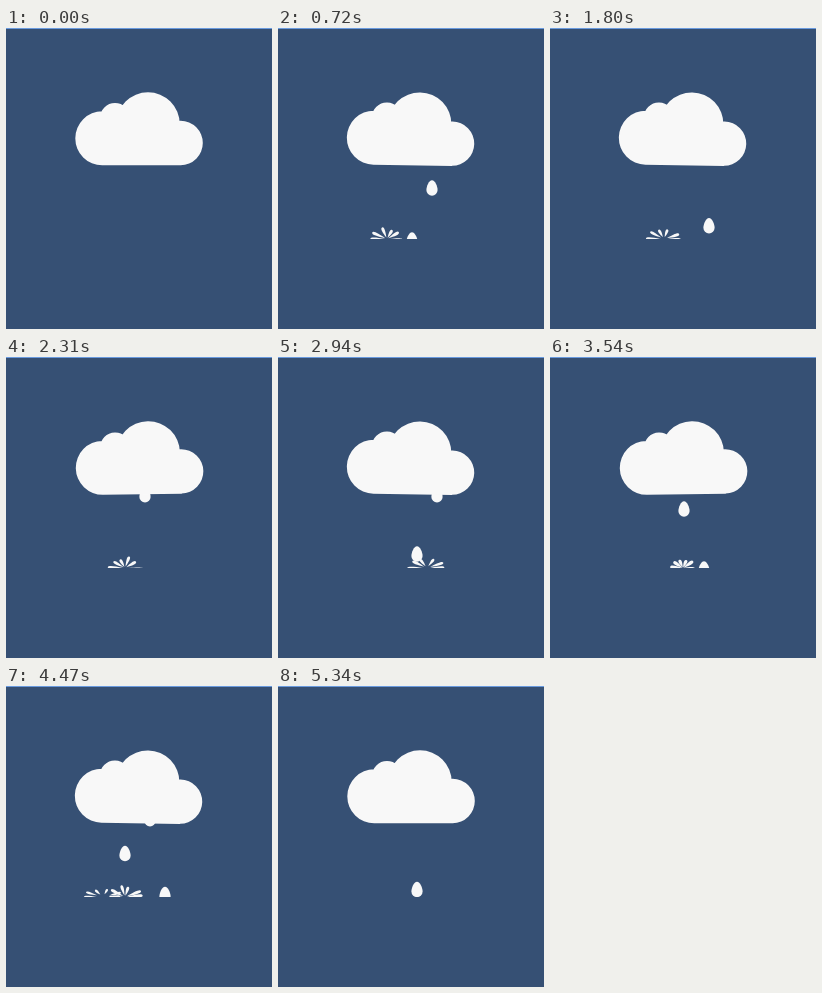
An HTML page with a canvas that plays this animation: 266 by 301 pixels, repeating every 5370 ms.

```html
<!DOCTYPE html>
<html lang="en">
<head>
<meta charset="utf-8">
<title>Rain cloud</title>
<style>
  html, body { margin: 0; width: 100%; height: 100%; overflow: hidden; background: #365074; }
  canvas { display: block; width: 266px; height: 301px; }
</style>
</head>
<body>
<canvas id="stage"></canvas>
<script>
const W = 266, H = 301, LOOP = 5370, STEP = 30;
const GROUND = 211, FALL = 400, SPLASH = 300;
const MAX_GAP = 400, GAP = 210, RAYS = 6;

const canvas = document.getElementById('stage');
const ctx = canvas.getContext('2d');
const ratio = window.devicePixelRatio || 1;
canvas.width = W * ratio;
canvas.height = H * ratio;

const clamp = (v, lo, hi) => Math.min(hi, Math.max(lo, v));
const noise = n => {
  const s = Math.sin(n * 12.9898) * 43758.5453;
  return s - Math.floor(s);
};

// Main drops as [landing time, x]; long gaps are filled with seeded ones.
const mainDrops = [
  [570, 109], [720, 134], [866, 154], [1110, 153], [1414, 99], [2160, 119],
  [2556, 139], [3430, 133], [3540, 154], [3717, 134], [4260, 97],
  [4320, 119], [4478, 159], [4590, 119], [4750, 144], [5360, 139]
];

function fillGaps(main) {
  const all = [];
  let last = 150;
  for (const [land, x] of main) {
    while (land - last > MAX_GAP) {
      last += GAP;
      all.push([last, 94 + 5 * Math.floor(17 * noise(last))]);
    }
    all.push([land, x]);
    last = land;
  }
  return all;
}

const drops = fillGaps(mainDrops);

const dropPath = new Path2D(
  'M0-7.8C3-7.8 5.6-1.8 5.6 2A5.6 5.6 0 0 1-5.6 2C-5.6-1.8-3-7.8 0-7.8Z');

const cloudPath = new Path2D();
for (const [x, y, r] of [[96.3, 110.3, 27], [109, 90, 15], [142, 96, 31.7], [174.6, 115, 22.2]]) {
  cloudPath.moveTo(x + r, y);
  cloudPath.arc(x, y, r, 0, 2 * Math.PI);
}
cloudPath.rect(96, 100, 79, 37.3);

function drawDrop(x, u) {
  ctx.save();
  ctx.translate(x, 125 + 87 * u * u);
  ctx.fill(dropPath);
  ctx.restore();
}

// A leaf from the centre side to a fuller outer end.
function drawPetal(x, y, angle, length, half) {
  ctx.save();
  ctx.translate(x, y);
  ctx.rotate(angle);
  ctx.beginPath();
  ctx.moveTo(0, 0);
  ctx.bezierCurveTo(length * 0.5, -half, length, -half * 1.8, length, 0);
  ctx.bezierCurveTo(length, half * 1.8, length * 0.5, half, 0, 0);
  ctx.fill();
  ctx.restore();
}

// Petals spread outwards while they rise and sink back into the ground.
function drawSplash(x, p, seed) {
  const spread = 21 * (1 - (1 - p) ** 2);
  const tail = p ** 3;
  for (let i = 0; i < RAYS; i++) {
    const a = Math.PI * (i + 0.4 * (noise(seed + i) - 0.5)) / (RAYS - 1);
    const reach = 0.9 + 0.3 * noise(seed * 2 + i);
    const dx = spread * reach * Math.cos(a);
    const dy = -10 * reach * Math.sin(Math.PI * p) * Math.sin(a);
    drawPetal(x + dx * tail, GROUND + dy * tail, Math.atan2(dy, dx),
      Math.hypot(dx, dy) * (1 - tail), 1.7 * Math.sqrt(1 - p) + 0.2);
  }
}

function drawCloud(t) {
  const fade = clamp(t / 100, 0, 1) * clamp((5300 - t) / 250, 0, 1);
  const swing = clamp(-4 * Math.sin(2 * Math.PI * (14 * t / LOOP + 0.02)), -1, 1);
  ctx.save();
  ctx.translate(133, 80);
  ctx.rotate(swing * fade * 0.9 * Math.PI / 180);
  ctx.translate(-133, -80);
  ctx.fill(cloudPath);
  ctx.restore();
}

function draw(t) {
  ctx.setTransform(ratio, 0, 0, ratio, 0, 0);
  ctx.fillStyle = '#365074';
  ctx.fillRect(0, 0, W, H);
  ctx.fillStyle = '#699ade';
  ctx.fillRect(0, 0, W, 1);
  ctx.fillStyle = '#f8f8f8';

  ctx.save();
  ctx.beginPath();
  ctx.rect(0, 0, W, GROUND);
  ctx.clip();
  for (const [land, x] of drops) {
    const u = (t - land) / FALL + 1;
    const p = (t - land) / SPLASH;
    if (u >= 0 && u < 1.09) drawDrop(x, u);
    if (p > 0 && p < 1) drawSplash(x, p, land);
  }
  ctx.restore();
  drawCloud(t);
}

const start = performance.now();
function tick() {
  const t = (performance.now() - start) % LOOP;
  draw(Math.floor(t / STEP) * STEP);
  requestAnimationFrame(tick);
}
tick();
</script>
</body>
</html>
```
